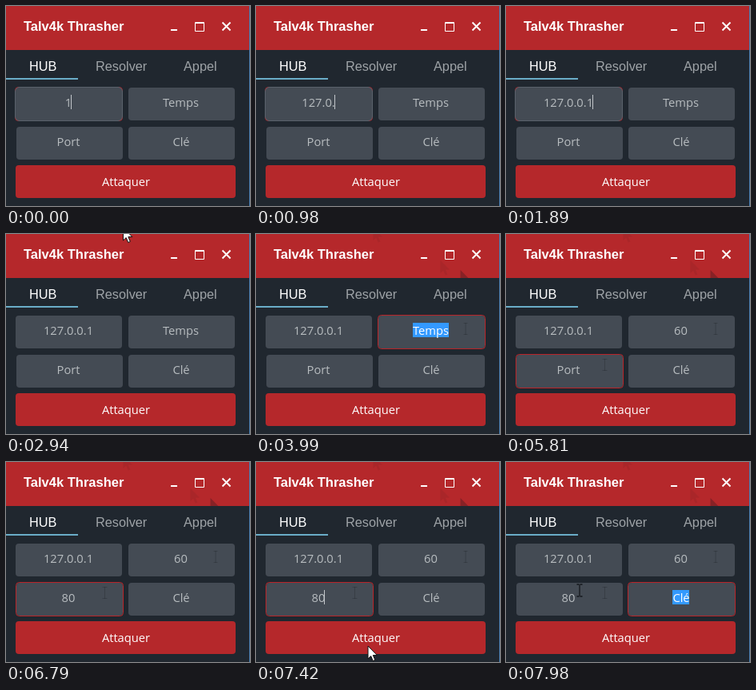
An HTML page that plays this animation: 305x250 px, repeating every 8 s.

```html
<!DOCTYPE html>
<html lang="fr">
<head>
<meta charset="utf-8">
<title>HUB</title>
<style>
  html, body { margin: 0; width: 100%; height: 100%; overflow: hidden; background: #20272f; }
  svg { display: block; }
  .title { font: bold 16.5px "Liberation Sans", Arial, sans-serif; fill: #fff; }
  .tab { font: 16.3px "Liberation Sans", Arial, sans-serif; fill: #9ea3a7; }
  .tab.on { fill: #fff; }
  .label { font: 14.7px "Open Sans", "Noto Sans", sans-serif; fill: #b8bdc0; text-anchor: middle; white-space: pre; }
  .label.sel, .label.go { fill: #fff; }
  .icon { fill: none; stroke: #fff; }
  .beam { fill: none; stroke: #14181c; }
  .edge { fill: none; stroke: #b92429; }
  .soft { fill: none; stroke: #59616b; }
</style>
</head>
<body>
<svg width="305" height="250" viewBox="0 0 305 250">
  <defs>
    <path id="shape" d="M0 0V16L3.7 12.6L6.2 18.6L8.8 17.4L6.3 11.6H11.4Z"/>
    <clipPath id="bar"><rect width="304" height="55"/></clipPath>
  </defs>
  <rect width="305" height="250" fill="#20272f"/>
  <rect width="304" height="55" fill="#b5282b"/>
  <rect x="304" width="1" height="250" fill="#4a7db0"/>
  <text class="title" x="22" y="31">Talv4k Thrasher</text>
  <g class="icon">
    <path d="M206 30H214" stroke-width="2"/>
    <path d="M236.5 20.5H247.5V31.5H236.5ZM236 21.5H248"/>
    <path d="M270.5 20.5L280.5 30.5M280.5 20.5L270.5 30.5" stroke-width="2"/>
  </g>
  <text class="tab on" x="29" y="81">HUB</text>
  <text class="tab" x="112" y="81">Resolver</text>
  <text class="tab" x="222" y="81">Appel</text>
  <rect y="90" width="90" height="2" fill="#6aadc8"/>
  <g id="fields"></g>
  <rect x="12" y="199" width="275" height="41" rx="4" fill="#b5282b"/>
  <text class="label go" x="150" y="225">Attaquer</text>
  <g id="trailBar" clip-path="url(#bar)" fill="#401a20">
    <use href="#shape" x="146.5" y="-8" opacity=".1"/>
    <use href="#shape" x="230.5" y="33" opacity=".1"/>
    <use href="#shape" x="255.5" y="45" opacity=".4"/>
  </g>
  <path id="trailTime" class="beam" d="M259.5 111.5H264.5M262 111V126M259.5 125.5H264.5" opacity=".25"/>
  <path id="trailPort" class="beam" d="M120.5 156.5H126.5M123.5 156V171M120.5 170.5H126.5" opacity=".25"/>
  <use id="arrow" href="#shape" fill="#fff" stroke="#111"/>
  <path id="beam" class="beam" d="M-3.5 -7.5H-.5M.5 -7.5H3.5M0 -7V7M-3.5 7.5H-.5M.5 7.5H3.5" stroke-width="1.3"/>
</svg>
<script>
const LOOP = 8000, STEP = 70;
const $ = id => document.getElementById(id);

// Per field: box, text centre, focus span and [time, text, mode] steps
const fields = [
  { x: 12, y: 102, cx: 78, focus: [0, 2030], soft: true,
    steps: [[0, "1", "caret"], [140, "12", "caret"], [350, "127", "caret"], [630, "127.", "caret"],
      [770, "127.0", "caret"], [980, "127.0.", "caret"], [1260, "127.0.0", "caret"],
      [1750, "127.0.0.", "caret"], [1890, "127.0.0.1", "caret"], [2030, "127.0.0.1"]] },
  { x: 153, y: 102, cx: 218.5, focus: [3500, 5250],
    steps: [[0, "Temps"], [3500, "Temps", "start"], [3990, "Temps", "sel"], [4060, "6", "caret"],
      [4130, "60", "caret"], [4550, "60"], [5040, "60", "caret"], [5250, "60"]] },
  { x: 13, y: 151, cx: 78, focus: [5250, 7910],
    steps: [[0, "Port"], [5250, "Port", "start"], [5810, "Port"], [6300, "8", "caret"],
      [6370, "80", "caret"], [6790, "80"], [7280, "80", "caret"], [7770, "80"]] },
  { x: 153, y: 151, cx: 219, focus: [7910, LOOP],
    steps: [[0, "Clé"], [7910, "Clé", "sel"]] }
];

// Pointer runs: one point per 70 ms step
const runs = [
  { from: 2940, to: 3500, pts: [[146.5, -8], [122, 14], [96, 26], [135, 30], [190, 30], [230.5, 33], [255.5, 45], [262, 118]] },
  { from: 4690, to: 5250, pts: [[262, 118], [225, 130], [165, 148], [130, 158], [121.5, 160], [122, 161], [123, 162], [123.5, 163.5]] },
  { from: 7070, to: LOOP, pts: [[123.5, 163.5], [170, 180], [230, 208], [280, 230], [225, 234], [140, 230],
      [65, 222], [17, 205], [35, 187], [66, 174], [86, 166], [92, 163], [92, 160.5]] }
];

function add(parent, tag, attrs) {
  const el = document.createElementNS("http://www.w3.org/2000/svg", tag);
  for (const k in attrs) el.setAttribute(k, attrs[k]);
  return parent.appendChild(el);
}
function show(el, on) { el.style.display = on ? "" : "none"; }

for (const f of fields) {
  const g = $("fields"), frame = { x: f.x - .5, y: f.y - .5, width: 134, height: 42 };
  add(g, "rect", { x: f.x, y: f.y, width: 133, height: 41, rx: 4, fill: "#444b54" });
  f.ring = add(g, "g", {});
  add(f.ring, "rect", { ...frame, rx: 4, class: "edge" });
  if (f.soft) add(f.ring, "rect", { ...frame, rx: 5.5, class: "soft" });
  f.mark = add(g, "rect", { y: f.y + 9, height: 18, fill: "#3399ff" });
  f.text = add(g, "text", { x: f.cx, y: f.y + 24, class: "label" });
  f.caret = add(g, "rect", { y: f.y + 9, width: 1, height: 18, fill: "#c3c7cb" });
}

function drawField(f, t) {
  const [, str, mode] = f.steps.filter(s => s[0] <= t).pop();
  if (f.text.textContent !== str) f.text.textContent = str;
  f.text.classList.toggle("sel", mode === "sel");
  const w = f.text.getComputedTextLength(), left = Math.round(f.cx - w / 2);
  show(f.ring, t >= f.focus[0] && t < f.focus[1]);
  show(f.mark, mode === "sel");
  f.mark.setAttribute("x", left);
  f.mark.setAttribute("width", Math.round(w));
  show(f.caret, mode === "caret" || mode === "start");
  f.caret.setAttribute("x", mode === "start" ? left : Math.round(f.cx + w / 2) - 1);
}

function drawPointer(t) {
  const run = runs.find(r => t >= r.from && t < r.to);
  const p = run && run.pts[Math.min(run.pts.length - 1, Math.floor((t - run.from) / STEP))];
  const inField = p && fields.some(f => p[0] > f.x && p[0] < f.x + 133 && p[1] > f.y && p[1] < f.y + 41);
  show($("beam"), p && inField);
  show($("arrow"), p && !inField);
  if (p) $(inField ? "beam" : "arrow").setAttribute("transform", `translate(${p})`);
}

function draw(now) {
  const t = now % LOOP;
  fields.forEach(f => drawField(f, t));
  drawPointer(t);
  show($("trailBar"), t >= 3430);
  show($("trailTime"), t >= 3500);
  show($("trailPort"), t >= 5250);
}

const start = performance.now();
function tick() {
  draw(performance.now() - start);
  requestAnimationFrame(tick);
}
tick();
</script>
</body>
</html>
```
